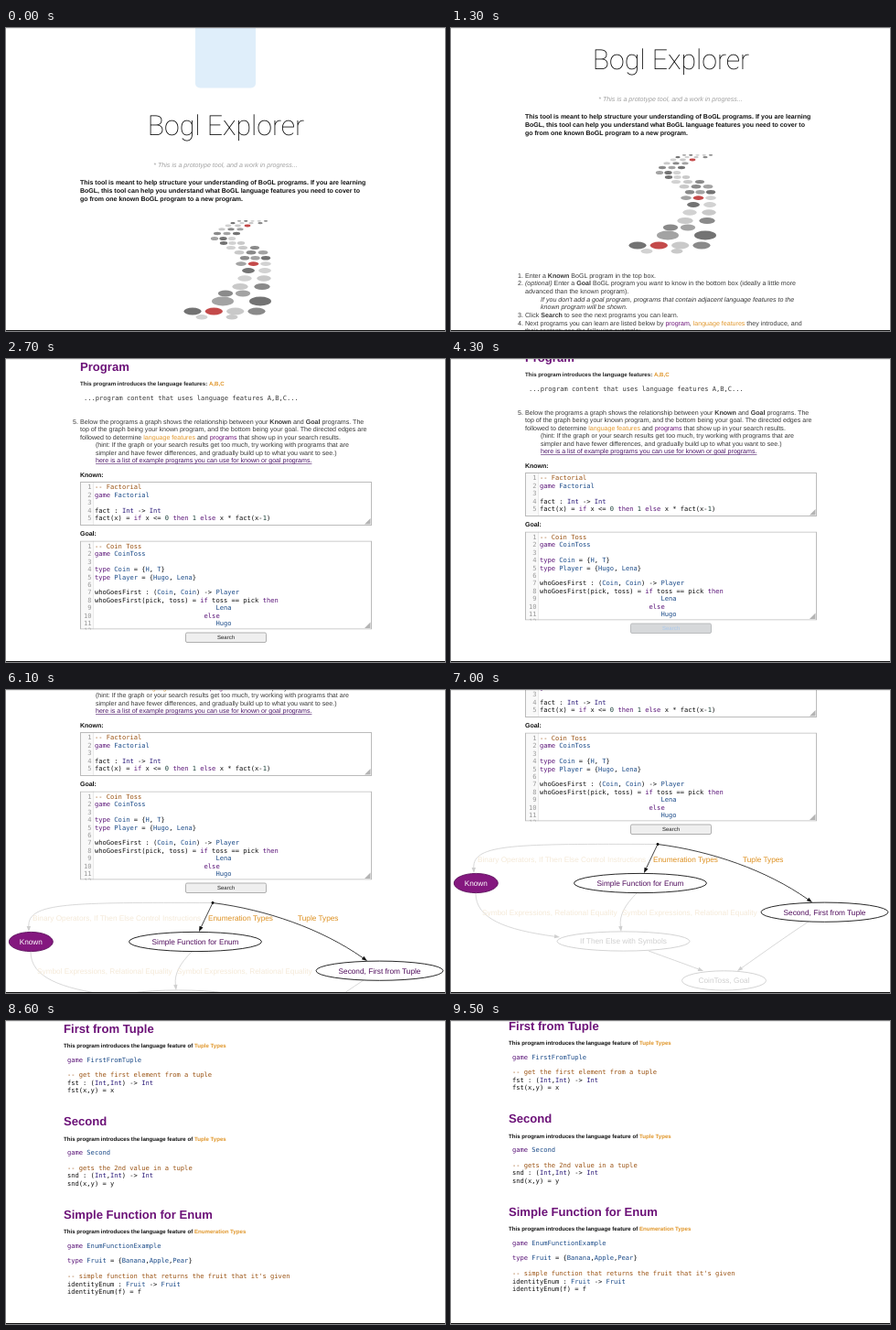
Recreate the animation shown at these times as an HTML page with a canvas. Size 480x331 px, loop 9600 ms.

```html
<!DOCTYPE html>
<html lang="en">
<head>
<meta charset="utf-8">
<title>Bogl Explorer</title>
<style>
html, body { margin: 0; width: 100%; height: 100%; overflow: hidden; background: #fff; }
canvas { display: block; }
</style>
</head>
<body>
<canvas id="stage" width="480" height="331"></canvas>
<script>
const W = 480, H = 331, LOOP = 9600, STEP = 100;
const ctx = document.getElementById('stage').getContext('2d');
ctx.textRendering = 'geometricPrecision';

const SANS = '"Liberation Sans", Arial, sans-serif';
const MONO = '"DejaVu Sans Mono", Menlo, monospace';
const BODY = 7.08, CODE = 7.1, LINE = 8.42;
const PURPLE = '#6c1278', ORANGE = '#e0962a', INK = '#383838', FAINT = '#cfcfcf';

// Scroll position: [ms, px], joined by a monotone curve
const SCROLL = [[900, 0], [2000, 295], [2900, 421], [5600, 421], [6100, 499],
  [7000, 563], [7900, 734], [8600, 929], [9300, 932]];

const slope = i => (SCROLL[i + 1][1] - SCROLL[i][1]) / (SCROLL[i + 1][0] - SCROLL[i][0]);

function tangent(i) {
  if (i === 0 || i === SCROLL.length - 1) return 0;
  const a = slope(i - 1), b = slope(i);
  return a * b > 0 ? 2 * a * b / (a + b) : 0;
}

function scrollAt(t) {
  const last = SCROLL.length - 1;
  if (t <= SCROLL[0][0]) return 0;
  if (t >= SCROLL[last][0]) return SCROLL[last][1];
  let i = 0;
  while (t >= SCROLL[i + 1][0]) i++;
  const [t0, y0] = SCROLL[i], [t1, y1] = SCROLL[i + 1];
  const d = t1 - t0, u = (t - t0) / d, v = 1 - u;
  return y0 * v * v * (1 + 2 * u) + y1 * u * u * (3 - 2 * u) +
    d * (tangent(i) * u * v * v - tangent(i + 1) * u * u * v);
}

// Text is placed by the middle of its capitals
function text(s, x, y, { size = BODY, style = '', color = INK, align = 'left', family = SANS } = {}) {
  ctx.font = `${style} ${size}px ${family}`;
  ctx.fillStyle = color;
  ctx.textAlign = align;
  ctx.fillText(s, x, y + size * 0.355);
  return ctx.measureText(s).width;
}

const MARKS = {
  '*': { style: 'bold' },
  '_': { style: 'italic' },
  '{': { color: PURPLE },
  '<': { color: ORANGE }
};

// *bold* _italic_ {purple} <orange>
function rich(s, x, y, base = {}) {
  for (const part of s.split(/(\*[^*]+\*|_[^_]+_|\{[^}]+\}|<[^>]+>)/)) {
    if (!part) continue;
    const mark = MARKS[part[0]];
    x += text(mark ? part.slice(1, -1) : part, x, y, { ...base, ...mark });
  }
}

function rows(list, x, y, step, base) {
  list.forEach((s, i) => rich(s, x, y + i * step, base));
}

function tokenColor(s) {
  if (s.startsWith('--')) return '#9a5212';
  if (/^(game|type|if|then|else)$/.test(s)) return '#5a1478';
  if (s === 'Int') return '#2a1a78';
  if (/^[A-Z]/.test(s)) return '#1a4a88';
  if (/^\d/.test(s)) return '#1a4038';
  return '#111';
}

function code(lines, x, y) {
  const opts = { size: CODE, family: MONO };
  lines.forEach((line, i) => {
    let cx = x;
    for (const s of line.match(/--.*|\w+|\s+|[^\w\s]+/g) || []) {
      cx += text(s, cx, y + i * LINE, { ...opts, color: tokenColor(s) });
    }
  });
}

function editor(y, h, lines) {
  ctx.save();
  ctx.beginPath();
  ctx.rect(81, y, 319, h);
  ctx.clip();
  ctx.fillStyle = '#f9f9f9';
  ctx.fillRect(82, y, 13, h);
  ctx.fillStyle = '#ddd';
  ctx.fillRect(95, y, 0.6, h);
  lines.forEach((_, i) => text(i + 1, 93.5, y + 5.8 + i * LINE,
    { size: CODE, family: MONO, color: '#999', align: 'right' }));
  code(lines, 97, y + 5.8);
  ctx.strokeStyle = '#bbb';
  ctx.lineWidth = 1;
  ctx.strokeRect(81.5, y + 0.5, 318, h - 1);
  ctx.fillStyle = '#b4b4b4';
  ctx.beginPath();
  ctx.moveTo(398.5, y + h - 8);
  ctx.lineTo(398.5, y + h - 1.5);
  ctx.lineTo(392, y + h - 1.5);
  ctx.fill();
  ctx.restore();
}

function ellipse(x, y, rx, ry) {
  ctx.beginPath();
  ctx.ellipse(x, y, rx, ry, 0, 0, Math.PI * 2);
}

// Rows of stepping stones: y, first x, last x, count, ry
const STONES = [
  [210.8, 255, 284, 5, 0.9], [213.2, 248, 278, 4, 1.1], [216, 243, 264, 3, 1.4],
  [219.8, 236, 256, 3, 1.5], [224.5, 231, 252, 3, 1.7], [230, 228, 247, 3, 2],
  [235, 238, 257, 3, 1.9], [240, 246, 272, 3, 2.1], [245.3, 255, 281, 3, 2.2],
  [251.3, 261, 284, 3, 2.3], [257.6, 257, 284, 3, 2.4], [265, 265, 283, 2, 2.9],
  [273.5, 261, 282, 2, 3.2], [282.5, 256, 280, 2, 3.6], [290, 240, 259, 2, 3.4],
  [298.5, 237, 278, 2, 5], [309.5, 204, 274, 4, 4], [315.8, 214, 247, 2, 2.7]
];
const GREYS = ['#737373', '#c9c9c9', '#a3a3a3', '#d2d2d2', '#8a8a8a'];
const isRed = (row, i) => (row === 2 && i === 2) || (row === 10 && i === 1) || (row === 16 && i === 1);

function stones() {
  STONES.forEach(([y, x0, x1, n, ry], row) => {
    const gap = (x1 - x0) / (n - 1);
    for (let i = 0; i < n; i++) {
      ellipse(x0 + i * gap, y, Math.min(gap * 0.44, ry * 2.4), ry);
      ctx.fillStyle = isRed(row, i) ? '#c44a4a' : GREYS[(row * 3 + i * 3 + 2) % 5];
      ctx.fill();
    }
  });
}

function intro() {
  ctx.fillStyle = '#dfeefa';
  ctx.beginPath();
  ctx.roundRect(207, -4, 66, 69.5, 5);
  ctx.fill();
  text('Bogl Explorer', 240.5, 106.5,
    { size: 30.3, style: '250', color: '#000', align: 'center', family: 'Roboto, "Liberation Sans", sans-serif' });
  text('* This is a prototype tool, and a work in progress...', 240, 149.5,
    { style: 'italic', color: '#a0a0a0', align: 'center' });
  rows([
    'This tool is meant to help structure your understanding of BoGL programs. If you are learning',
    'BoGL, this tool can help you understand what BoGL language features you need to cover to',
    'go from one known BoGL program to a new program.'
  ], 81, 169, 8.9, { size: 7, style: 'bold', color: '#111' });
  stones();
}

function heading(s, x, y) {
  text(s, x, y, { size: 13.1, style: 'bold', color: PURPLE });
}

function steps() {
  [[1, 342], [2, 350.7], [3, 385.3], [4, 394], [5, 479]].forEach(([n, y]) => text(n + '.', 73, y));
  rows([
    'Enter a *Known* BoGL program in the top box.',
    '_(optional)_ Enter a *Goal* BoGL program you _want_ to know in the bottom box (ideally a little more',
    'advanced than the known program).'
  ], 81, 342, 8.7);
  rows([
    "If you don't add a goal program, programs that contain adjacent language features to the",
    'known program will be shown.'
  ], 98, 368, 8.7, { style: 'italic' });
  rows([
    'Click *Search* to see the next programs you can learn.',
    'Next programs you can learn are listed below by {program}, <language features> they introduce, and',
    'their content; see the following example:'
  ], 81, 385.3, 8.7);
  heading('Program', 81, 419.3);
  rich('This program introduces the language features: <A,B,C>', 81, 438, { size: 6.14, style: 'bold', color: '#222' });
  text('...program content that uses language features A,B,C...', 85, 453, { size: CODE, family: MONO });
  rows([
    'Below the programs a graph shows the relationship between your *Known* and *Goal* programs. The',
    'top of the graph being your known program, and the bottom being your goal. The directed edges are',
    'followed to determine <language features> and {programs} that show up in your search results.'
  ], 81, 479, 8.7);
  rows([
    '(hint: If the graph or your search results get too much, try working with programs that are',
    'simpler and have fewer differences, and gradually build up to what you want to see.)'
  ], 98, 504.7, 8.5);
  const w = text('here is a list of example programs you can use for known or goal programs.', 98, 521.7, { color: '#4b1668' });
  ctx.fillRect(98, 525, w, 0.6);
}

function form(busy) {
  const label = { size: 7, style: 'bold', color: '#111' };
  text('Known:', 81, 537.3, label);
  editor(545, 48, [
    '-- Factorial',
    'game Factorial',
    '',
    'fact : Int -> Int',
    'fact(x) = if x <= 0 then 1 else x * fact(x-1)'
  ]);
  text('Goal:', 81, 601.7, label);
  editor(609.5, 97, [
    '-- Coin Toss',
    'game CoinToss',
    '',
    'type Coin = {H, T}',
    'type Player = {Hugo, Lena}',
    '',
    'whoGoesFirst : (Coin, Coin) -> Player',
    'whoGoesFirst(pick, toss) = if toss == pick then',
    ' '.repeat(31) + 'Lena',
    ' '.repeat(28) + 'else',
    ' '.repeat(31) + 'Hugo',
    ''
  ]);
  ctx.beginPath();
  ctx.roundRect(196.5, 710, 88, 10.5, 1.5);
  ctx.fillStyle = busy ? '#d6d8da' : '#efefef';
  ctx.fill();
  ctx.strokeStyle = busy ? '#b6b8ba' : '#a8a8a8';
  ctx.lineWidth = 0.9;
  ctx.stroke();
  text('Search', 240.5, 715.3, { size: 6, align: 'center', color: busy ? '#a9c9ee' : '#222' });
}

function edge(color, x0, y0, ax, ay, bx, by, x1, y1) {
  const len = Math.hypot(x1 - bx, y1 - by), dx = (x1 - bx) / len, dy = (y1 - by) / len;
  const ex = x1 - dx * 6, ey = y1 - dy * 6;
  ctx.strokeStyle = ctx.fillStyle = color;
  ctx.lineWidth = 0.8;
  ctx.beginPath();
  ctx.moveTo(x0, y0);
  ctx.bezierCurveTo(ax, ay, bx, by, ex, ey);
  ctx.stroke();
  ctx.beginPath();
  ctx.moveTo(x1, y1);
  ctx.lineTo(ex - dy * 2.2, ey + dx * 2.2);
  ctx.lineTo(ex + dy * 2.2, ey - dx * 2.2);
  ctx.fill();
}

function node(s, x, y, rx, line, ink, fill = '#fff') {
  ellipse(x, y, rx, 10.6);
  ctx.fillStyle = fill;
  ctx.fill();
  ctx.strokeStyle = line;
  ctx.lineWidth = 0.9;
  ctx.stroke();
  text(s, x, y, { size: 8.25, color: ink, align: 'center' });
}

function graph() {
  ctx.save();
  ctx.translate(0, 563);
  edge(FAINT, 226, 168.5, 70, 168, 24, 168, 25, 200);
  edge(FAINT, 27, 222, 27, 250, 60, 262, 119, 270);
  edge(FAINT, 203, 222, 190, 235, 184, 246, 186, 264);
  edge(FAINT, 216, 285, 235, 292, 255, 299, 276, 307);
  edge(FAINT, 391, 253, 365, 270, 340, 288, 313, 307);
  edge('#111', 226, 168.5, 222, 177, 218, 185, 211, 200);
  edge('#111', 226, 168.5, 285, 176, 345, 197, 395, 232);
  ellipse(226, 168.5, 1.4, 1.4);
  ctx.fillStyle = '#000';
  ctx.fill();

  const pale = { size: 8.25, color: '#f4e9d8' }, strong = { size: 8.25, color: '#dd9020' };
  const shared = 'Symbol Expressions, Relational Equality';
  text('Binary Operators, If Then Else Control Instructions', 29, 185, pale);
  text(shared, 34, 243, pale);
  text(shared, 187, 243, pale);
  text('Enumeration Types', 221, 185, strong);
  text('Tuple Types', 319, 185, strong);

  node('Known', 27.3, 211, 24, '#5c0f5c', '#fff', '#84187f');
  node('Simple Function for Enum', 207, 211, 72.5, '#111', '#500d5c');
  node('Second, First from Tuple', 408.5, 242.7, 69.5, '#111', '#500d5c');
  node('If Then Else with Symbols', 188.5, 274.5, 72.5, FAINT, FAINT);
  node('CoinToss, Goal', 298.5, 317.4, 46, FAINT, FAINT);
  ctx.restore();
}

function result(title, feature, y, lines) {
  heading(title, 63, y);
  rich(`This program introduces the language feature of <${feature}>`, 63, y + 19.3,
    { size: 6.14, style: 'bold', color: '#111' });
  code(lines, 67, y + 34);
}

function results() {
  text('found 3 next programs', 240.5, 914, { size: 7.2, color: '#909090', align: 'center' });
  result('First from Tuple', 'Tuple Types', 937, [
    'game FirstFromTuple',
    '',
    '-- get the first element from a tuple',
    'fst : (Int,Int) -> Int',
    'fst(x,y) = x'
  ]);
  result('Second', 'Tuple Types', 1038.4, [
    'game Second',
    '',
    '-- gets the 2nd value in a tuple',
    'snd : (Int,Int) -> Int',
    'snd(x,y) = y'
  ]);
  result('Simple Function for Enum', 'Enumeration Types', 1140, [
    'game EnumFunctionExample',
    '',
    'type Fruit = {Banana,Apple,Pear}',
    '',
    "-- simple function that returns the fruit that it's given",
    'identityEnum : Fruit -> Fruit',
    'identityEnum(f) = f'
  ]);
}

function draw(t) {
  ctx.fillStyle = '#fff';
  ctx.fillRect(0, 0, W, H);
  ctx.save();
  ctx.translate(0, -Math.round(scrollAt(t)));
  intro();
  steps();
  form(t >= 4300 && t < 5100);
  if (t >= 5100) {
    graph();
    results();
  }
  ctx.restore();
  ctx.fillStyle = 'rgba(0,0,0,.08)';
  ctx.fillRect(0, 0, W, 1);
  ctx.fillStyle = '#111';
  ctx.fillRect(0, H - 1, W, 1);
}

const start = performance.now();
function tick() {
  const t = (performance.now() - start + 15) % LOOP;
  draw(Math.floor(t / STEP) * STEP);
  requestAnimationFrame(tick);
}
tick();
</script>
</body>
</html>
```
